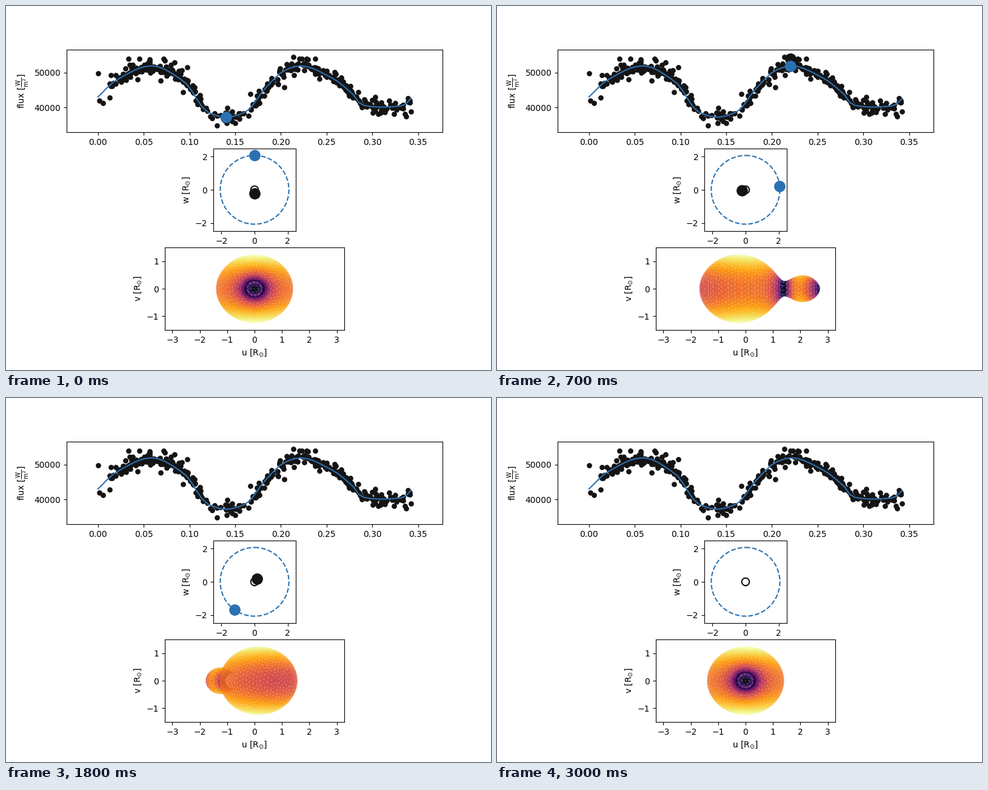
Write a matplotlib script that moves like this. It is 800 by 600 pixels and loops after 3.1 s.

```python
import numpy as np
import matplotlib.pyplot as plt
from matplotlib.animation import FuncAnimation
from matplotlib.collections import PolyCollection

FRAMES = 31
BLUE, BLACK = "#2b71b1", "#141414"
Q, OMEGA = 0.11, 1.939           # mass ratio and surface potential
R2 = 2.075                       # orbit radius of the light star
R1 = Q * R2
SMA = R1 + R2
PERIOD, T_START, T_END = 0.3438, 0.1404, 0.3425
EDGE = 0.062                     # mesh edge in units of the separation

# key points: time in 0.001 d, flux in 100 W/m^2
MODEL = [(0, 430), (20, 478), (58.6, 519), (94.4, 473), (120, 387),
         (140.4, 372), (162, 388), (182, 452), (205.7, 508), (221.6, 519),
         (254.8, 486), (278.6, 438), (288.6, 407), (310, 401), (333.6, 405),
         (342.3, 426)]
STRAYS = [(0, 498), (1.5, 419), (5.5, 412), (33.4, 539), (130.1, 348),
          (140.4, 371), (197.4, 466), (213.7, 544), (220.6, 540),
          (254.8, 485), (300.8, 385), (342.2, 388)]


def to_units(pairs):
    t, f = np.array(pairs, float).T
    return t / 1000, f * 100


def model_flux(t):
    """Monotone cubic curve through the key points."""
    kt, kf = to_units(MODEL)
    h, d = np.diff(kt), np.diff(kf) / np.diff(kt)
    inner = [2 * p * q / (p + q) if p * q > 0 else 0 for p, q in zip(d, d[1:])]
    m = np.concatenate([d[:1], inner, d[-1:]])
    k = np.clip(np.searchsorted(kt, t, side="right") - 1, 0, len(h) - 1)
    u = (t - kt[k]) / h[k]
    return ((1 + 2 * u) * (1 - u)**2 * kf[k] + u * (1 - u)**2 * h[k] * m[k]
            + u**2 * (3 - 2 * u) * kf[k + 1]
            - u**2 * (1 - u) * h[k] * m[k + 1])


def observations():
    """Heavy-tailed noise around the model, denser where it is bright."""
    rng = np.random.default_rng(12)
    t = rng.uniform(0.012, T_END, 560)
    f = model_flux(t - 0.002)
    keep = rng.uniform(0, 1, len(t)) < 0.42 + 0.45 * (f - 37000) / 15000
    f = f + np.clip(700 * rng.standard_t(2.5, len(t)), -4500, 4500)
    f = np.clip(f, 35500, 54000)
    ts, fs = to_units(STRAYS)
    ts, fs = np.append(ts, t[keep]), np.append(fs, f[keep])
    order = np.argsort(ts)
    return ts[order], fs[order]


def potential(x, y, z):
    r1 = np.sqrt(x**2 + y**2 + z**2)
    r2 = np.sqrt((x - 1)**2 + y**2 + z**2)
    return 1 / r1 + Q * (1 / r2 - x) + 0.5 * (1 + Q) * (x**2 + y**2)


def outward_gradient(p):
    x, y, z = p.T
    r1 = np.sqrt(x**2 + y**2 + z**2)**3
    r2 = np.sqrt((x - 1)**2 + y**2 + z**2)**3
    gx = x / r1 + Q * (x - 1) / r2 + Q - (1 + Q) * x
    gy = y / r1 + Q * y / r2 - (1 + Q) * y
    gz = z / r1 + Q * z / r2
    return np.stack([gx, gy, gz], axis=1)


def bisect(inside, lo, hi):
    for _ in range(45):
        mid = (lo + hi) / 2
        keep = inside(mid)
        lo, hi = np.where(keep, mid, lo), np.where(keep, hi, mid)
    return (lo + hi) / 2


def surface_radius(x, phi):
    """Distance from the long axis to the surface at x in direction phi."""
    x, phi = np.broadcast_arrays(np.asarray(x, float), phi)
    return bisect(
        lambda r: potential(x, r * np.sin(phi), r * np.cos(phi)) > OMEGA,
        np.full(x.shape, 1e-6), np.full(x.shape, 0.64))


def stitch(a, b):
    """Triangles between two rings, each given as (first index, angles)."""
    (a0, pa), (b0, pb) = a, b
    n, m = len(pa), len(pb)
    na, nb = np.append(pa, pa[0] + 2 * np.pi), np.append(pb, pb[0] + 2 * np.pi)
    i = j = 0
    tris = []
    while i < n or j < m:
        p, r = a0 + i % n, b0 + j % m
        if j == m or (i < n and na[i + 1] < nb[j + 1]):
            i += 1
            tri = (p, r, a0 + i % n)
        else:
            j += 1
            tri = (p, r, b0 + j % m)
        if len(set(tri)) == 3:
            tris.append(tri)
    return tris


def build_mesh():
    """Rings of nodes along the axis; also returns the x of the neck."""
    back = -float(bisect(lambda d: potential(-d, 0, 0) > OMEGA, 0.3, 0.8))
    tip = 1 + float(bisect(lambda d: potential(1 + d, 0, 0) > OMEGA, 0.1, 0.34))
    xs = (back + tip) / 2 - (tip - back) / 2 * np.cos(np.linspace(0, np.pi, 800))
    rho = surface_radius(xs, 0.0)
    rho[[0, -1]] = 0
    between = (xs > 0.4) & (xs < 0.95)
    neck = xs[between][np.argmin(rho[between])]
    arc = np.append(0, np.cumsum(np.hypot(np.diff(xs), np.diff(rho))))
    count = int(round(arc[-1] / (0.866 * EDGE)))
    ring_s = np.linspace(0, arc[-1], count + 1)
    ring_x, ring_r = np.interp(ring_s, arc, xs), np.interp(ring_s, arc, rho)

    rng = np.random.default_rng(3)
    points, tris, last, total = [], [], None, 0
    for k, (x, r) in enumerate(zip(ring_x, ring_r)):
        if k in (0, count):
            phi, radius = np.zeros(1), np.zeros(1)
        else:
            n = max(6, int(round(2 * np.pi * r / EDGE)))
            phi = (np.arange(n) + rng.uniform(0, 1)) * 2 * np.pi / n
            radius = surface_radius(x, phi)
        points.append(np.stack([np.full(len(phi), x), radius * np.sin(phi),
                                radius * np.cos(phi)], axis=1))
        ring = (total, phi)
        if last:
            tris += stitch(last, ring)
        last, total = ring, total + len(phi)
    return np.concatenate(points), np.array(tris), neck


points, tris, neck = build_mesh()
centers = points[tris].mean(axis=1)
normals = outward_gradient(centers)
is_heavy = centers[:, 0] < neck
teff = np.linalg.norm(normals, axis=1)**0.08      # gravity darkening
shade = (teff - teff.min()) / (teff.max() - teff.min())
colors = plt.get_cmap("inferno")(shade)
corners = (points - [Q / (1 + Q), 0, 0]) * SMA

model_t = np.linspace(0, 0.3423, 61)
data_t, data_f = observations()

fig, (ax_flux, ax_orbit, ax_mesh) = plt.subplots(
    3, 1, figsize=(8, 6), dpi=100, facecolor="white")
fig.subplots_adjust(left=0.125, right=0.9, bottom=0.11, top=0.88, hspace=0.2)


def highlight(ax, color, z):
    return ax.plot([], [], "o", color=color, ms=13.5, mew=0, zorder=z)[0]


ax_flux.set(xlim=(-0.1 * T_END, 1.1 * T_END), ylim=(32938, 56528),
            xticks=np.arange(8) * 0.05, yticks=[40000, 50000],
            ylabel=r"flux [$\mathrm{\frac{W}{m^{2}}}$]")
ax_flux.plot(data_t, data_f, "o", color=BLACK, ms=6.3, mew=0, zorder=2)
ax_flux.plot(model_t, model_flux(model_t), color=BLUE, lw=1.5, zorder=4)
flux_data = highlight(ax_flux, BLACK, 3)
flux_model = highlight(ax_flux, BLUE, 5)

reach = 1.2 * R2
ax_orbit.set(xlim=(-reach, reach), ylim=(-reach, reach), aspect="equal",
             xticks=[-2, 0, 2], yticks=[-2, 0, 2],
             ylabel=r"w [$\mathrm{R_{\odot}}$]")
turn = np.linspace(0, 2 * np.pi, 101)
ax_orbit.plot(-R1 * np.sin(turn), -R1 * np.cos(turn), color=BLACK, lw=1.5)
ax_orbit.plot(R2 * np.sin(turn), R2 * np.cos(turn), "--", color=BLUE, lw=1.5)
heavy_star = highlight(ax_orbit, BLACK, 3)
light_star = highlight(ax_orbit, BLUE, 4)

ax_mesh.set(xlim=(-3.276, 3.276), ylim=(-1.503, 1.503), aspect="equal",
            xticks=range(-3, 4), yticks=[-1, 0, 1],
            xlabel=r"u [$\mathrm{R_{\odot}}$]",
            ylabel=r"v [$\mathrm{R_{\odot}}$]")
envelope = PolyCollection([], edgecolors="none", linewidths=0, zorder=1)
ax_mesh.add_collection(envelope, autolim=False)


def update(i):
    theta = 2 * np.pi * i / (FRAMES - 1)
    s, c = np.sin(theta), np.cos(theta)

    t = T_START + PERIOD * i / (FRAMES - 1)
    flux_data.set_data([t], [np.interp(t, data_t, data_f)])
    flux_model.set_data([t], [model_flux(t)])
    for marker in (flux_data, flux_model):
        marker.set_visible(t <= T_END)

    light_star.set_data([R2 * s], [R2 * c])
    heavy_star.set_data([-R1 * s], [-R1 * c])
    for star in (light_star, heavy_star):
        star.set_visible(i < FRAMES - 1)

    # front faces only, far to near, the heavy star painted over the light one
    x, y, z = corners.T
    projected = np.stack([x * s + y * c, z], axis=1)
    depth = centers[:, 0] * c - centers[:, 1] * s
    front = np.flatnonzero(normals[:, 0] * c - normals[:, 1] * s > 0)
    front = front[np.lexsort((depth[front], is_heavy[front]))]
    envelope.set_verts(projected[tris[front]])
    envelope.set_facecolor(colors[front])
    return flux_data, flux_model, light_star, heavy_star, envelope


anim = FuncAnimation(fig, update, frames=FRAMES, interval=100,
                     repeat=True, repeat_delay=0, blit=False)
plt.show()
```
